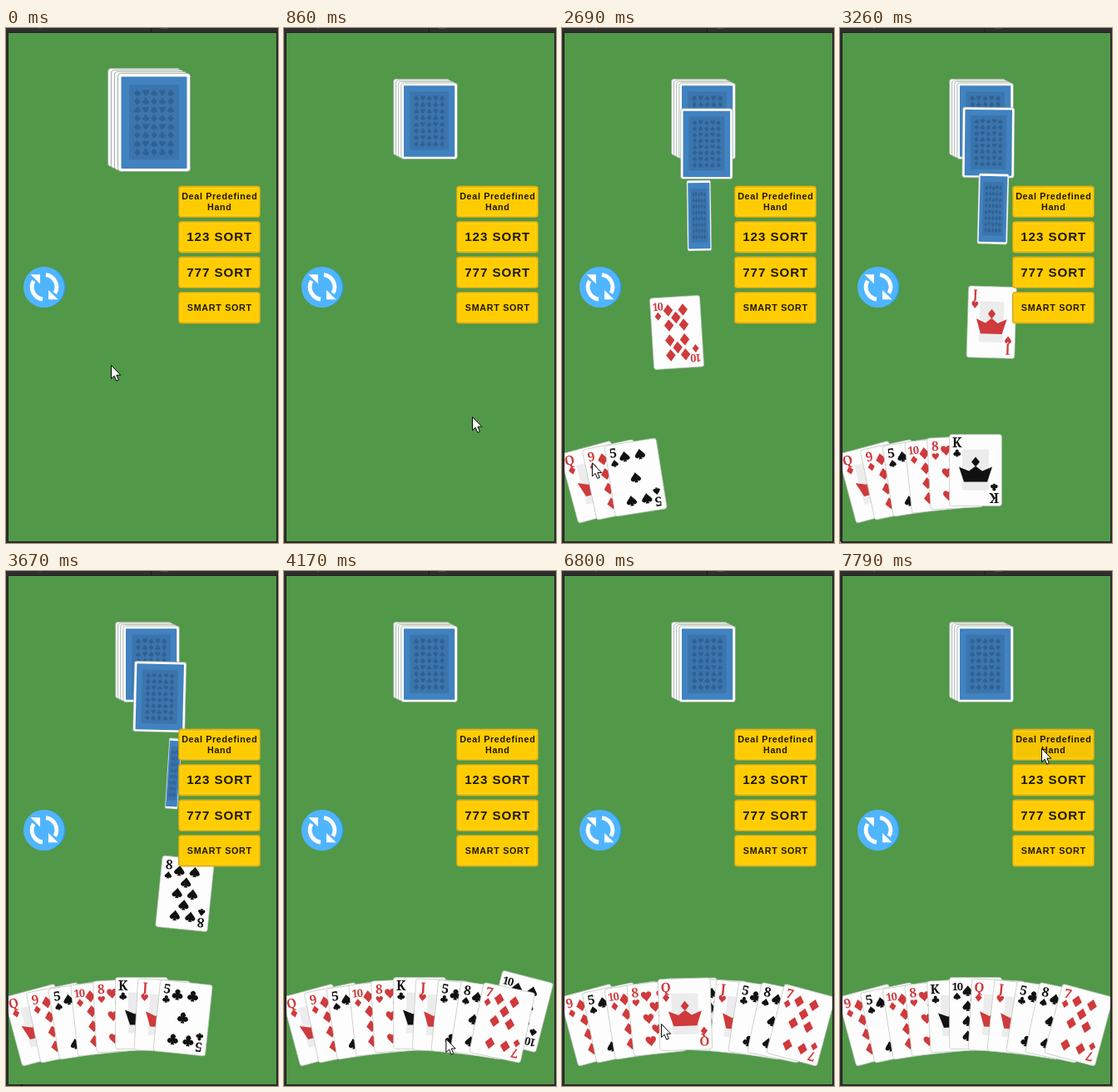
Animation, 327 px wide and 619 px high, one loop 8 s. Source, as an HTML page:

```html
<!DOCTYPE html>
<html lang="en">
<head>
<meta charset="utf-8">
<title>Card hand</title>
<style>
html, body { margin: 0; width: 100%; height: 100%; overflow: hidden; background: #2b2b2b; }
svg { display: block; width: 327px; height: 619px; }
.label { font: bold 10.8px "Liberation Sans", Arial, sans-serif; letter-spacing: .06em; text-anchor: middle; fill: #1f1800; }
.rank { font: 600 15.5px "Noto Serif", serif; text-anchor: middle; }
</style>
</head>
<body>
<svg id="stage" viewBox="0 0 327 619" xmlns="http://www.w3.org/2000/svg">
  <defs>
    <clipPath id="table"><rect x="3" y="6" width="322" height="611"/></clipPath>
    <g id="back"></g>
  </defs>
  <rect width="327" height="619" fill="#2f2f2f"/>
  <path d="M174.5 0V5" stroke="#1a1a1a"/>
  <path d="M40 .5h2M186 .5h9" stroke="#505050"/>
  <rect x="2.5" y="5.5" width="323" height="612" fill="#529849" stroke="#222"/>
  <g clip-path="url(#table)">
    <g id="deck"></g>
    <g id="cards"></g>
  </g>
  <g id="buttons"></g>
  <g id="refresh">
    <circle cx="47.5" cy="311.5" r="24" fill="#2c9cf2"/>
    <circle cx="45.5" cy="311.5" r="24.5" fill="#50b5ff"/>
  </g>
  <path id="cursor" d="M.5 .5V16.5L4.2 13.2L6.8 19.2L9.4 18L6.9 12.2H11.8Z" fill="#fff" stroke="#000" stroke-width="1"/>
</svg>
<script>
const LOOP = 8000, RED = '#cf3a3c', BLACK = '#111';
const $ = id => document.getElementById(id);
const clamp = v => Math.max(0, Math.min(1, v));
const mix = (a, b, p) => a + (b - a) * p;
const smooth = p => p * p * (3 - 2 * p);
const easeOut = p => 1 - (1 - p) ** 2;

function make(tag, attrs, parent, text) {
  const el = document.createElementNS('http://www.w3.org/2000/svg', tag);
  for (const k in attrs) el.setAttribute(k, attrs[k]);
  if (text) el.textContent = text;
  parent.appendChild(el);
  return el;
}

// Suits fit a box of about 10 units around the origin.
const suits = {
  D: 'M0-5.8L4.8 0L0 5.8L-4.8 0Z',
  H: 'M0 5C-2 2-5 .5-5-2A2.6 2.6 0 0 1 0-3A2.6 2.6 0 0 1 5-2C5 .5 2 2 0 5Z',
  S: 'M0-5C2-2 5 0 5 2A2.5 2.5 0 0 1 .8 3L1.9 5H-1.9L-.8 3A2.5 2.5 0 0 1-5 2C-5 0-2-2 0-5Z',
  C: 'M-1.6-1A2.4 2.4 0 1 1 1.6-1A2.4 2.4 0 1 1 .8 2.6L1.9 5H-1.9L-.8 2.6A2.4 2.4 0 1 1-1.6-1Z'
};
const crown = 'M-14 14H14L20-4L8 1L0-5L-8 1L-20-4ZM0-16L5-10L0-4L-5-10Z';

function pip(parent, suit, x, y, size, fill) {
  make('path', { d: suits[suit], fill, transform: `translate(${x} ${y}) scale(${size})` }, parent);
}

// Card back, 88 x 119, centred.
function drawBack() {
  const g = $('back');
  make('rect', { x: -43.6, y: -59.1, width: 87.2, height: 118.2, rx: 4, fill: '#fff', stroke: '#8b9a8b', 'stroke-width': .8 }, g);
  make('rect', { x: -39.5, y: -55, width: 79, height: 110.5, rx: 1, fill: '#4182c0' }, g);
  make('rect', { x: -30, y: -45.5, width: 60, height: 90.5, fill: '#3b75ad' }, g);
  for (let r = 0; r < 8; r++)
    for (let c = 0; c < 5; c++)
      pip(g, (r % 2 ? 'DC' : 'SH')[c % 2], (c - 2) * 10, (r - 3.5) * 10.2, .78, '#2f6193');
}

// Pip spots as [column, row]; rows run from -27 to 27.
function spots(n) {
  const rows = n > 8 ? [-27, -9, 9, 27] : n > 5 ? [-27, 0, 27] : [-27, 27];
  const mid = { 5: [0], 7: [-13.5], 8: [-13.5, 13.5], 9: [0], 10: [-18, 18] }[n];
  return rows.flatMap(y => [[-9.3, y], [9.3, y]]).concat(mid.map(y => [0, y]));
}

// Card face, 63 x 86, centred.
function drawFace(g, rank, suit) {
  const fill = 'DH'.includes(suit) ? RED : BLACK;
  make('rect', { x: -31.4, y: -42.9, width: 62.8, height: 85.8, rx: 3, fill: '#fdfdfd', stroke: '#bcc4bc', 'stroke-width': .7 }, g);
  if (+rank) {
    for (const [x, y] of spots(+rank)) pip(g, suit, x, y, 1.25, fill);
  } else {
    make('rect', { x: -16, y: -25, width: 32, height: 49, fill: '#ececec' }, g);
    make('path', { d: crown, fill }, g);
  }
  for (const turn of [0, 180]) {
    const corner = make('g', { transform: `rotate(${turn})` }, g);
    const text = make('text', { x: -22.3, y: -27.5, class: 'rank', fill }, corner, rank);
    if (rank === '10') text.setAttribute('style', 'font-size:13px;letter-spacing:-1px');
    pip(corner, suit, -22.3, -20.5, .86, fill);
  }
}

function drawDeck() {
  for (let i = 3; i >= 0; i--)
    make('use', { href: '#back', x: 178 - 4 * i, y: 113.5 - 2 * i }, $('deck'));
}

function drawButton(y, lines, size) {
  const g = $('buttons');
  const face = make('rect', { x: 207.5, y, width: 98, height: 37.5, rx: 3, fill: '#ffcc00', stroke: '#c9a312' }, g);
  make('rect', { x: 209, y: y + 1.5, width: 95, height: 34.5, rx: 2, fill: 'none', stroke: '#e9b703' }, g);
  make('rect', { x: 210, y: y + 2.5, width: 93, height: 32.5, rx: 1.5, fill: 'none', stroke: '#ffd940', 'stroke-width': .8 }, g);
  lines.forEach((line, i) => make('text', {
    x: 256.8, y: y + 18.5 + size * .35 + (i - (lines.length - 1) / 2) * 13,
    class: 'label', style: `font-size:${size}px`
  }, g, line));
  return face;
}

function drawRefresh() {
  for (const turn of [0, 180]) {
    const g = make('g', { transform: `translate(46 311.3) rotate(${turn})` }, $('refresh'));
    make('path', { d: 'M-2 14.7A14.8 14.8 0 0 1-12.8-7.4', fill: 'none', stroke: '#fff', 'stroke-width': 4.8 }, g);
    make('path', { d: 'M-16.5-15H-5V-3.8Z', fill: '#fff' }, g);
  }
}

drawBack();
drawDeck();
drawRefresh();
const dealButton = drawButton(190, ['Deal Predefined', 'Hand'], 10.8);
drawButton(232.5, ['123 SORT'], 15.2);
drawButton(275, ['777 SORT'], 15.2);
drawButton(317.5, ['SMART SORT'], 10.8);

const FLIGHT = 735, MIDDLE = 5;
const FAN = { x: 163, y: 531.5, dx: 24.8, dy: 2.85, turn: 3 };
const HOME = { x: 174.6, y: 112, a: 0 };
const starts = [1557, 1742, 1933, 2123, 2310, 2504, 2705, 2895, 3081, 3265, 3450];
const cards = 'QD 9D 5S 10D 8H KC JH 5C 8S 7D 10S'.split(' ').map((name, i) => {
  const el = make('g', {}, $('cards'));
  const face = make('g', {}, el);
  drawFace(face, name.slice(0, -1), name.slice(-1));
  const back = make('use', { href: '#back', transform: 'scale(.716)' }, el);
  return { el, face, back, start: starts[i] };
});

const drags = [
  { card: 10, from: 10, to: 6, t0: 4840, t1: 5420, t2: 5700 },
  { card: 0, from: 0, to: 6, t0: 6390, t1: 6960, t2: 7300 }
];

// Pointer path: time, x, y.
const path = [
  [0, 126, 405], [220, 126, 405], [280, 91, 440], [360, 290, 391], [420, 226, 467],
  [1540, 226, 467], [2000, 81, 490], [2340, 60, 505], [2690, 36, 522], [2900, 10, 575],
  [3260, -9, 607], [3700, 20, 618], [4030, 133, 592], [4170, 194, 562], [4470, 298, 530],
  [4840, 298, 530], [5100, 258, 516], [5420, 200, 518], [5620, 38, 550], [5740, 0, 560],
  [5910, 10, 557], [6390, 10, 557], [6650, 80, 545], [6960, 160, 543], [7190, 205, 362],
  [7480, 232, 262], [7700, 242, 213], [8000, 242, 213]
];

function pointer(t) {
  let i = 1;
  while (i < path.length - 1 && t > path[i][0]) i++;
  const [t0, x0, y0] = path[i - 1], [t1, x1, y1] = path[i];
  const p = clamp((t - t0) / (t1 - t0));
  return { x: mix(x0, x1, p), y: mix(y0, y1, p) };
}

function slotPose(s) {
  const n = s - MIDDLE;
  return { x: FAN.x + n * FAN.dx, y: FAN.y + Math.abs(n) * FAN.dy, a: n * FAN.turn };
}
const slotAt = x => MIDDLE + (x - FAN.x) / FAN.dx;
const mixPose = (p, q, k) => ({ x: mix(p.x, q.x, k), y: mix(p.y, q.y, k), a: mix(p.a, q.a, k) });

function heldPose(d, t) {
  const now = pointer(t), grab = pointer(d.t0), home = slotPose(d.from);
  const x = home.x + now.x - grab.x;
  return { x, y: home.y + now.y - grab.y, a: slotPose(slotAt(x)).a };
}

// Hand layout after all drags up to time t.
function handPoses(t) {
  const slots = cards.map((_, i) => i);
  let held = -1, heldAt;
  for (const d of drags) {
    if (t < d.t0) break;
    const drop = easeOut(clamp((t - d.t1) / (d.t2 - d.t1)));
    const pose = mixPose(heldPose(d, Math.min(t, d.t1)), slotPose(d.to), drop);
    const u = slotAt(pose.x), dir = Math.sign(d.to - d.from);
    slots.forEach((k, i) => {
      if (i === d.card || (k - d.from) * dir <= 0 || (d.to - k) * dir < 0) return;
      slots[i] = k - dir * smooth(clamp(((u - k) * dir + .9) / .8));
    });
    slots[d.card] = drop < 1 ? u : d.to;
    held = t < d.t2 ? d.card : -1;
    heldAt = pose;
  }
  return { slots, held, poses: slots.map((s, i) => i === held ? heldAt : slotPose(s)) };
}

let lastOrder = '';
function draw(t) {
  const k = mix(1, .775, smooth(clamp((t - 670) / 190)));
  $('deck').setAttribute('transform', `translate(163 106) scale(${k}) translate(-163 -106)`);

  const hand = handPoses(t);
  const depth = [];
  cards.forEach((c, i) => {
    const p = clamp((t - c.start) / FLIGHT);
    const pose = mixPose(HOME, hand.poses[i], p * p);
    const turn = clamp((p - .36) * 395 / 180) * Math.PI;
    const up = turn > Math.PI / 2;
    c.el.style.display = p > 0 ? '' : 'none';
    c.face.style.display = up ? '' : 'none';
    c.back.style.display = up ? 'none' : '';
    c.el.setAttribute('transform',
      `translate(${pose.x} ${pose.y}) rotate(${pose.a}) scale(${Math.max(.03, Math.abs(Math.cos(turn)))} 1)`);
    const lifted = i === hand.held && t < drags.find(d => d.card === i).t1;
    depth[i] = p < 1 ? -1 - i : hand.slots[i] + (lifted ? 50 : 0);
  });
  const order = cards.map((_, i) => i).sort((a, b) => depth[a] - depth[b]);
  if (order.join() !== lastOrder) {
    lastOrder = order.join();
    order.forEach(i => $('cards').appendChild(cards[i].el));
  }

  const m = pointer(t);
  $('cursor').setAttribute('transform', `translate(${m.x} ${m.y})`);
  const hover = m.x > 207 && m.x < 306 && m.y > 190 && m.y < 228;
  dealButton.setAttribute('fill', hover ? '#f5c400' : '#ffcc00');
}

const begin = performance.now();
function tick() {
  draw((performance.now() - begin) % LOOP);
  requestAnimationFrame(tick);
}
tick();
</script>
</body>
</html>
```
